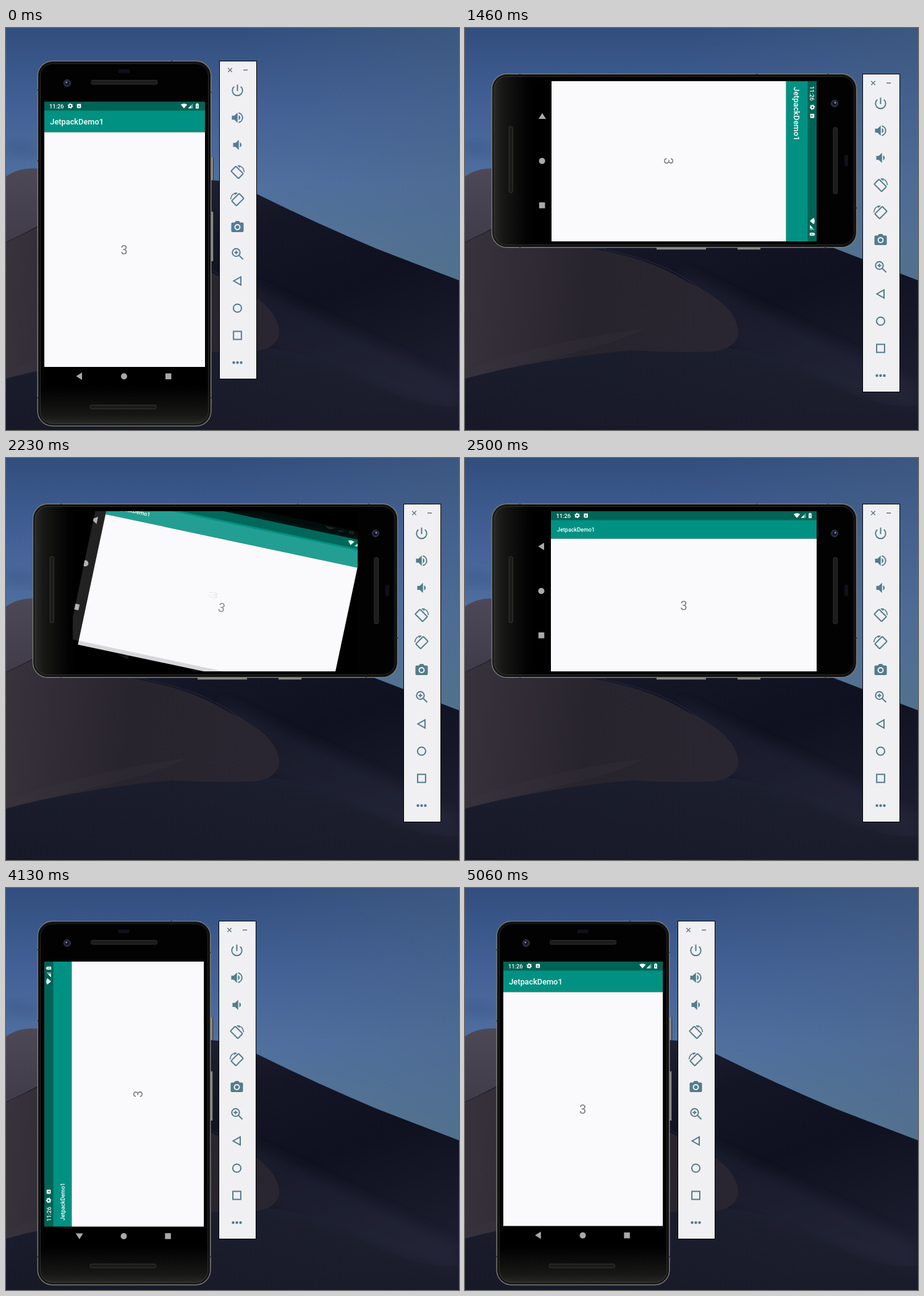
An HTML page that plays this animation: 733 by 650 pixels, repeating every 5.66 s.

```html
<!DOCTYPE html>
<html lang="en">
<head>
<meta charset="utf-8">
<title>Rotating phone</title>
<style>
  html, body { margin: 0; width: 100%; height: 100%; overflow: hidden; background: #1a1c2d; }
  svg { display: block; width: 733px; height: 650px; }
  text { font-family: Roboto, sans-serif; }
  .title { font-weight: 500; fill: #fff; }
  .clock { font-size: 9.3px; font-weight: 500; fill: #fff; }
  .count { font-size: 20px; fill: #7d7d7f; text-anchor: middle; }
  .line { fill: none; stroke: currentColor; stroke-width: 2; }
</style>
</head>
<body>
<svg viewBox="0 0 733 650">
  <defs>
    <linearGradient id="sky" x1="0" y1="0" x2="0" y2="420" gradientUnits="userSpaceOnUse">
      <stop offset="0" stop-color="#324e7e"/>
      <stop offset=".3" stop-color="#426096"/>
      <stop offset=".6" stop-color="#5070a0"/>
      <stop offset="1" stop-color="#587a94"/>
    </linearGradient>
    <linearGradient id="haze" x1="0" y1="0" x2="1" y2="0">
      <stop offset=".5" stop-color="#4a6482" stop-opacity="0"/>
      <stop offset="1" stop-color="#4a6482" stop-opacity=".4"/>
    </linearGradient>
    <linearGradient id="leftDune" x1="0" y1="227" x2="0" y2="400" gradientUnits="userSpaceOnUse">
      <stop offset="0" stop-color="#4d4856"/>
      <stop offset="1" stop-color="#3a3642"/>
    </linearGradient>
    <linearGradient id="mainDune" x1="330" y1="250" x2="480" y2="650" gradientUnits="userSpaceOnUse">
      <stop offset="0" stop-color="#1e1f31"/>
      <stop offset=".22" stop-color="#141626"/>
      <stop offset=".55" stop-color="#0f1120"/>
      <stop offset="1" stop-color="#1b1d2e"/>
    </linearGradient>
    <linearGradient id="lobe" x1="0" y1="400" x2="440" y2="440" gradientUnits="userSpaceOnUse">
      <stop offset="0" stop-color="#37323c"/>
      <stop offset=".45" stop-color="#28242d"/>
      <stop offset="1" stop-color="#2a2631"/>
    </linearGradient>
    <linearGradient id="floor" x1="0" y1="520" x2="0" y2="650" gradientUnits="userSpaceOnUse">
      <stop offset="0" stop-color="#1e2131"/>
      <stop offset="1" stop-color="#191b29"/>
    </linearGradient>
    <linearGradient id="chin" x1="0" y1="0" x2="0" y2="1">
      <stop offset=".9" stop-color="#020203"/>
      <stop offset=".97" stop-color="#171715"/>
      <stop offset="1" stop-color="#2b2b28"/>
    </linearGradient>
    <filter id="soft" x="-30%" y="-30%" width="160%" height="160%"><feGaussianBlur stdDeviation="9"/></filter>

    <clipPath id="display"><rect id="displayRect"/></clipPath>
    <clipPath id="box"><rect id="boxRect"/></clipPath>

    <g id="leftIcons" fill="#fff">
      <circle r="2.4" fill="none" stroke="#fff" stroke-width="1.9"/>
      <circle r="3.7" fill="none" stroke="#fff" stroke-width="1.2" stroke-dasharray="1.9 1.97"/>
      <rect x="10.8" y="-3.2" width="6.6" height="6.6" rx=".8"/>
      <path d="M12.5 2L14.1-2L15.7 2z" fill="#47857c"/>
    </g>
    <g id="rightIcons" fill="#fff">
      <path d="M-5.2-2.2Q0-5.5 5.2-2.2L0 4z"/>
      <path d="M6.6 4H14.4V-4z" opacity=".45"/>
      <path d="M6.6 4H11.4V-.9z"/>
      <path d="M19-3.2h1.3v-1h2.2v1h1.3v7.4h-4.8z"/>
      <path d="M21.7-1.5l-1.5 2.5h1l-.2 2 1.5-2.6h-1z" fill="#006355"/>
    </g>

    <g id="portrait">
      <rect width="260" height="461"/>
      <rect width="260" height="15" fill="#006355"/>
      <rect y="14.5" width="260" height="35" fill="#009182"/>
      <rect y="49.5" width="260" height="379.5" fill="#fafafc"/>
      <text class="clock" x="8" y="10.6">11:26</text>
      <use href="#leftIcons" x="42" y="7"/>
      <use href="#rightIcons" x="226" y="7"/>
      <text class="title" x="9.3" y="37" font-size="12.8">JetpackDemo1</text>
      <text class="count" x="129" y="247">3</text>
      <path d="M61 438v12l-9.5-6z" fill="#a9a9a9"/>
      <circle cx="129" cy="444.3" r="5" fill="#a9a9a9"/>
      <rect x="196" y="439.5" width="9.5" height="9.5" fill="#a9a9a9"/>
    </g>
    <g id="landscape">
      <rect width="461" height="260"/>
      <rect x="31" width="430" height="15" fill="#006355"/>
      <rect x="31" y="14.5" width="430" height="30" fill="#009182"/>
      <rect x="31" y="44.5" width="430" height="215.5" fill="#fafafc"/>
      <text class="clock" x="39.5" y="10.6">11:26</text>
      <use href="#leftIcons" x="73.5" y="7"/>
      <use href="#rightIcons" x="429" y="7"/>
      <text class="title" x="41" y="33.4" font-size="9">JetpackDemo1</text>
      <text class="count" x="246" y="160">3</text>
      <path d="M20 51v12l-9.5-6z" fill="#a9a9a9"/>
      <circle cx="15.5" cy="129" r="5" fill="#a9a9a9"/>
      <rect x="10.8" y="196" width="9.5" height="9.5" fill="#a9a9a9"/>
    </g>
  </defs>

  <!-- wallpaper -->
  <rect width="733" height="650" fill="url(#sky)"/>
  <rect width="733" height="420" fill="url(#haze)"/>
  <path d="M0 184Q25 182 60 200L50 207L0 203z" fill="#34507f" opacity=".4" filter="url(#soft)"/>
  <path d="M0 240Q20 226 48 227Q140 240 240 300V420H0z" fill="url(#leftDune)"/>
  <path d="M0 346Q60 318 110 285Q250 238 345 247Q372 251 405 268Q500 315 600 357Q670 384 733 408V650H0z" fill="url(#mainDune)"/>
  <path d="M345 390Q430 430 530 478T733 576V625Q600 585 430 520z" fill="#303448" opacity=".3" filter="url(#soft)"/>
  <path d="M0 565Q130 520 300 518Q450 500 560 560T733 610V650H0z" fill="url(#floor)" opacity=".75"/>
  <path d="M0 347Q60 318 120 290L205 357Q300 372 360 411Q442 448 442 494Q438 519 400 523Q330 525 270 521Q120 535 0 567z" fill="url(#lobe)"/>
  <path d="M0 553Q140 505 290 486Q240 514 90 544L0 566z" fill="#3c3842" opacity=".2"/>
  <path d="M225 358Q335 380 385 426" fill="none" stroke="#3a3a50" stroke-width="1.2" opacity=".4"/>

  <g id="device">
    <g id="body">
      <path d="M333.5 209v37M333.5 297v80" stroke="#8a8a87" stroke-width="4"/>
      <path d="M335.5 209v37M335.5 297v80" stroke="#2c2c2c"/>
      <path d="M333 459v30M333 600v8" stroke="#292b36" stroke-width="1.5"/>
      <rect x="51.3" y="53.5" width="280.4" height="590" rx="24" fill="url(#chin)" stroke="#7b7c78" stroke-width="1.5"/>
      <rect x="53.2" y="55.4" width="276.6" height="586.2" rx="22" fill="none" stroke="#161616" stroke-width="2"/>
      <rect x="55.5" y="57.7" width="272" height="581.6" rx="20" fill="none" stroke="#41423f" stroke-width=".7"/>
      <path d="M51 100h3M51 215h2M329 104h3M51 598h2M329 598h3M268 53v3" stroke="#22231f" stroke-width="2"/>
      <rect x="138" y="84.5" width="107" height="6.5" rx="2" fill="#1c1c1c" stroke="#303030"/>
      <rect x="136.5" y="609.8" width="106.5" height="6" rx="2" fill="#1a1a1a" stroke="#393936"/>
      <rect x="182" y="67" width="18" height="6" rx="1" fill="#10101a"/>
      <circle cx="99" cy="89" r="5.5" fill="#262836" stroke="#3c3e48"/>
      <circle cx="99" cy="89" r="2.8" fill="#0d102c"/>
      <circle cx="98" cy="88" r="1.4" fill="#8894c8"/>
    </g>
    <g clip-path="url(#display)">
      <rect x="62" y="86" width="508" height="494"/>
      <g id="spin"><g clip-path="url(#box)"><use id="incoming"/><use id="outgoing"/></g></g>
    </g>
  </g>

  <g id="toolbar">
    <rect x=".5" y=".5" width="60" height="514" fill="#f0f0f3" stroke="#000"/>
    <path d="M14.2 11.7l6.6 6.6M20.8 11.7l-6.6 6.6M39 15h7" stroke="#60737e" stroke-width="1.3"/>
    <rect id="press" x="11.5" width="36.5" height="34" rx="3"/>
    <g id="icons"></g>
  </g>
</svg>
<script>
const $ = id => document.getElementById(id);
const set = (id, attrs) => {
  for (const [name, value] of Object.entries(attrs)) $(id).setAttribute(name, value);
};

const line = d => `<path class="line" d="${d}"/>`;
const solid = d => `<path d="${d}"/>`;
const speaker = solid('M-9-3.2h4l5.2-5v16.4l-5.2-5h-4z') + solid('M2-4.2Q4.7-2.7 4.7 0T2 4.2z');
const tilted = '<rect class="line" x="-8.5" y="-5.5" width="17" height="11" rx="1" transform="translate(-.5 .5) rotate(45)"/>'
  + '<path class="line" style="stroke-width:1.6" d="M.5-10Q10-10 11 0"/>' + solid('M0-10.8h5l-1.2 4z');
const icons = [
  line('M-5.3-6.2A8.2 8.2 0 1 0 5.3-6.2M0-9.5V1'),
  speaker + line('M2-7.8A8 8 0 0 1 2 7.8'),
  `<g transform="translate(2)">${speaker}</g>`,
  tilted,
  `<g transform="scale(-1 1)">${tilted}</g>`,
  solid('M-8-6.5h3.5l2-2.5h5l2 2.5H8q2 0 2 2V7q0 2-2 2H-8q-2 0-2-2V-4.5q0-2 2-2z')
    + '<circle cy="1" r="4" fill="currentColor" stroke="#f0f0f3" stroke-width="2"/>',
  '<circle class="line" cx="-2" cy="-2" r="6.2"/>' + line('M2.7 2.7L9 9M-5-2h6M-2-5v6'),
  line('M5.5-6.6V6.6L-6 0z'),
  '<circle class="line" r="6.6"/>',
  line('M-6.4-6.4H6.4V6.4H-6.4z'),
  [-6, 0, 6].map(x => `<circle cx="${x}" r="2.2"/>`).join('')
];
$('icons').innerHTML = icons.map((shape, i) =>
  `<g fill="currentColor" transform="translate(29.5 ${48 + 44 * i})">${shape}</g>`).join('');

const LOOP = 5660;
const screens = { portrait: [260, 461], landscape: [461, 260] };

// Window layouts and the time each one appears.
const upright = { view: 'portrait', center: [192, 349.5], body: '' };
const poses = [
  { ...upright, at: 0, display: [62, 119, 260, 461], bar: [345, 53], tint: '#587a95', device: '' },
  { at: 1400, view: 'landscape', center: [338.5, 216], display: [108, 86, 461, 259], bar: [643, 74],
    tint: '#537c89', device: '', body: 'translate(337.5 215) rotate(90) translate(-192 -349.5)',
    from: 'portrait', angle: 90, turnAt: 2100 },
  { ...upright, at: 4040, display: [62, 119, 259, 461], bar: [344, 53], tint: '#537c89',
    device: 'translate(62 119) scale(.9965) translate(-62 -119)',
    from: 'landscape', angle: -90, turnAt: 4660 }
];
const presses = [
  { from: 1300, to: 1400, row: 4, fill: '#d4d4d5' },
  { from: 3960, to: 4040, row: 3, fill: '#d5d8d3' }
];

const STEP = 36, TURN = 437, HEAD_START = 37;
function turnProgress(pose, t) {
  if (!pose.from) return 1;
  if (t < pose.turnAt) return 0;
  const elapsed = HEAD_START + Math.floor((t - pose.turnAt) / STEP) * STEP;
  return t >= pose.turnAt + 400 ? 1 : 1 - Math.max(0, 1 - elapsed / TURN) ** 5;
}

function draw(t) {
  const pose = poses.findLast(p => t >= p.at);
  const p = turnProgress(pose, t);
  const [w, h] = screens[pose.view];
  const outgoing = pose.from || pose.view;
  const [oldW, oldH] = screens[outgoing];
  const boxW = oldW + (w - oldW) * p, boxH = oldH + (h - oldH) * p;
  const [x, y, width, height] = pose.display;

  set('device', { transform: pose.device });
  set('body', { transform: pose.body });
  set('displayRect', { x, y, width, height });
  set('boxRect', { x: -boxW / 2, y: -boxH / 2, width: boxW, height: boxH });
  set('spin', { transform: `translate(${pose.center}) rotate(${(pose.angle || 0) * (1 - p)})` });
  set('incoming', { href: '#' + pose.view, transform: `translate(${-w / 2} ${-h / 2})` });
  set('outgoing', {
    href: '#' + outgoing, opacity: 1 - p,
    transform: `scale(${boxW / oldW} ${boxH / oldH}) translate(${-oldW / 2} ${-oldH / 2})`
  });

  const press = presses.find(k => t >= k.from && t < k.to);
  set('toolbar', { transform: `translate(${pose.bar})`, color: pose.tint });
  set('press', press ? { y: 31 + 44 * press.row, fill: press.fill } : { fill: 'none' });
}

const start = performance.now();
function tick() {
  draw((performance.now() - start) % LOOP);
  requestAnimationFrame(tick);
}
tick();
</script>
</body>
</html>
```
